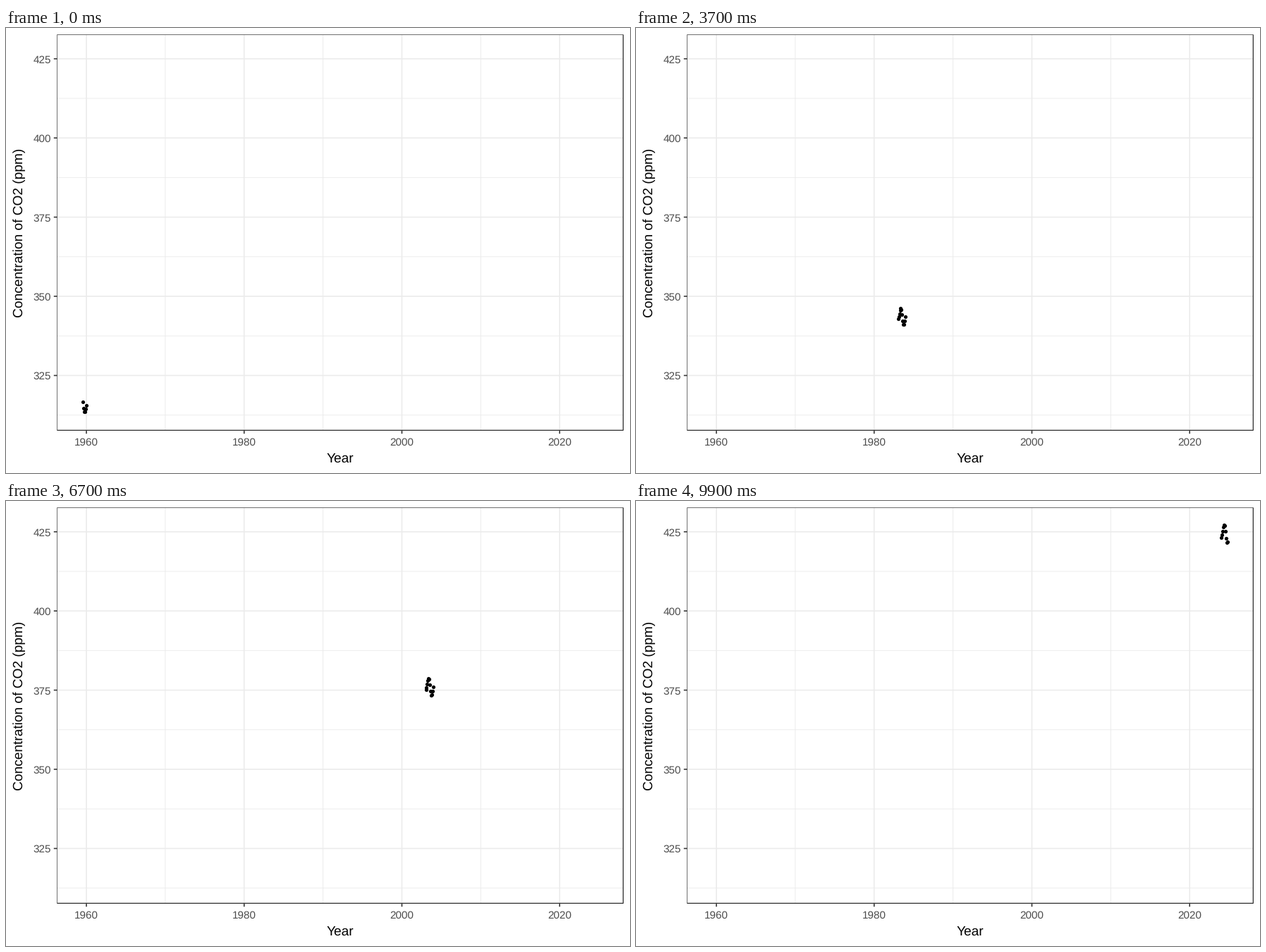
A matplotlib script for the animation above (10000 ms loop, 885 by 632 pixels).

```python
import numpy as np
import matplotlib.pyplot as plt
from matplotlib.animation import FuncAnimation

W, H, DPI = 885, 632, 100
FRAMES, INTERVAL = 100, 100
PX = 72 / DPI  # points per pixel
LEFT, TOP, RIGHT, BOTTOM = 72.5, 9.5, 875.5, 571.5
DARK, GRID, LABEL = "#333333", "#ebebeb", "#4d4d4d"

START, END = 1959.5, 2024.8  # span of the record
YEARS = np.arange(int(START), int(END) + 1)
KEYS = np.round(np.linspace(0, FRAMES - 1, len(YEARS))).astype(int)

# Key points of the long-term trend, ppm
TREND_T = [1959.5, 1966.5, 1970.5, 1975.5, 1980.5, 1988.5, 1992.5,
           1995.5, 2000.5, 2003.5, 2010.5, 2017.5, 2025]
TREND_V = [316.0, 321.4, 325.7, 331.1, 338.8, 351.6, 356.5,
           361.0, 369.7, 376.0, 390.1, 406.9, 425.6]


def to_x(year):
    return 114.0 + (year - 1960) * 11.187


def to_y(ppm):
    return 43.7 + (425 - ppm) * 4.498


def concentration(t):
    """Trend plus a two-harmonic seasonal cycle that slowly grows."""
    season = (2.77 * np.cos(2 * np.pi * (t - 0.310))
              + 0.78 * np.cos(4 * np.pi * (t + 0.049)))
    growth = 0.9 + 0.0025 * (t - 1960)
    return np.interp(t, TREND_T, TREND_V) + growth * season


def year_points(year):
    """Pixel positions of one year's monthly values."""
    t = year + (np.arange(12) + 0.5) / 12
    t = t[(t > START) & (t < END)]
    return np.column_stack([to_x(t), to_y(concentration(t))])


STATES = [year_points(year) for year in YEARS]


def points_at(frame):
    i = np.searchsorted(KEYS, frame, side="right") - 1
    if KEYS[i] == frame:
        return STATES[i]
    a, b = STATES[i], STATES[i + 1]
    n = min(len(a), len(b))
    t = (frame - KEYS[i]) / (KEYS[i + 1] - KEYS[i])
    return a[:n] + (b[:n] - a[:n]) * t


plt.rcParams["font.family"] = "Liberation Sans"
plt.rcParams["text.hinting"] = "none"
fig = plt.figure(figsize=(W / DPI, H / DPI), dpi=DPI, facecolor="white")
ax = fig.add_axes([0, 0, 1, 1])
ax.set(xlim=(0, W), ylim=(H, 0))
ax.axis("off")


def line(xs, ys, color, width, z):
    ax.plot(xs, ys, color=color, lw=width * PX, zorder=z, snap=False,
            solid_capstyle="butt")


def vline(x, color, width, z, y0=TOP, y1=BOTTOM):
    line([x, x], [y0, y1], color, width, z)


def hline(y, color, width, z, x0=LEFT, x1=RIGHT):
    line([x0, x1], [y, y], color, width, z)


def text(x, y, s, size, color, **kw):
    ax.text(x, y, s, fontsize=size, color=color, va="baseline", **kw)


for year in range(1970, 2011, 20):
    vline(to_x(year), GRID, 0.93, 1)
for ppm in np.arange(312.5, 425, 25):
    hline(to_y(ppm), GRID, 0.93, 1)
for year in range(1960, 2021, 20):
    x = to_x(year)
    vline(x, GRID, 1.6, 2)
    vline(x, DARK, 1.6, 3, BOTTOM, BOTTOM + 4.7)
    text(x, 592.6, str(year), 11, LABEL, ha="center")
for ppm in range(325, 426, 25):
    y = to_y(ppm)
    hline(y, GRID, 1.6, 2)
    hline(y, DARK, 1.6, 3, LEFT - 4.7, LEFT)
    text(64.3, y + 5.8, str(ppm), 11, LABEL, ha="right")

# The panel clips its border, so the top and left edges look thinner
hline(TOP + 0.15, DARK, 0.7, 5)
vline(LEFT + 0.15, DARK, 0.7, 5)
hline(BOTTOM - 0.15, DARK, 1.3, 5)
vline(RIGHT - 0.15, DARK, 1.3, 5)

text(474, 617.2, "Year", 13.75, "black", ha="center")
text(24.5, 290.7, "Concentration of CO2 (ppm)", 13.75, "black", ha="center",
     rotation=90, rotation_mode="anchor")

dots, = ax.plot([], [], "o", color="black", ms=5.2 * PX, mew=0, zorder=4,
                snap=False)


def update(frame):
    dots.set_data(*points_at(frame).T)
    return dots,


anim = FuncAnimation(fig, update, frames=FRAMES, interval=INTERVAL,
                     repeat=True, repeat_delay=0, blit=False)
plt.show()
```
